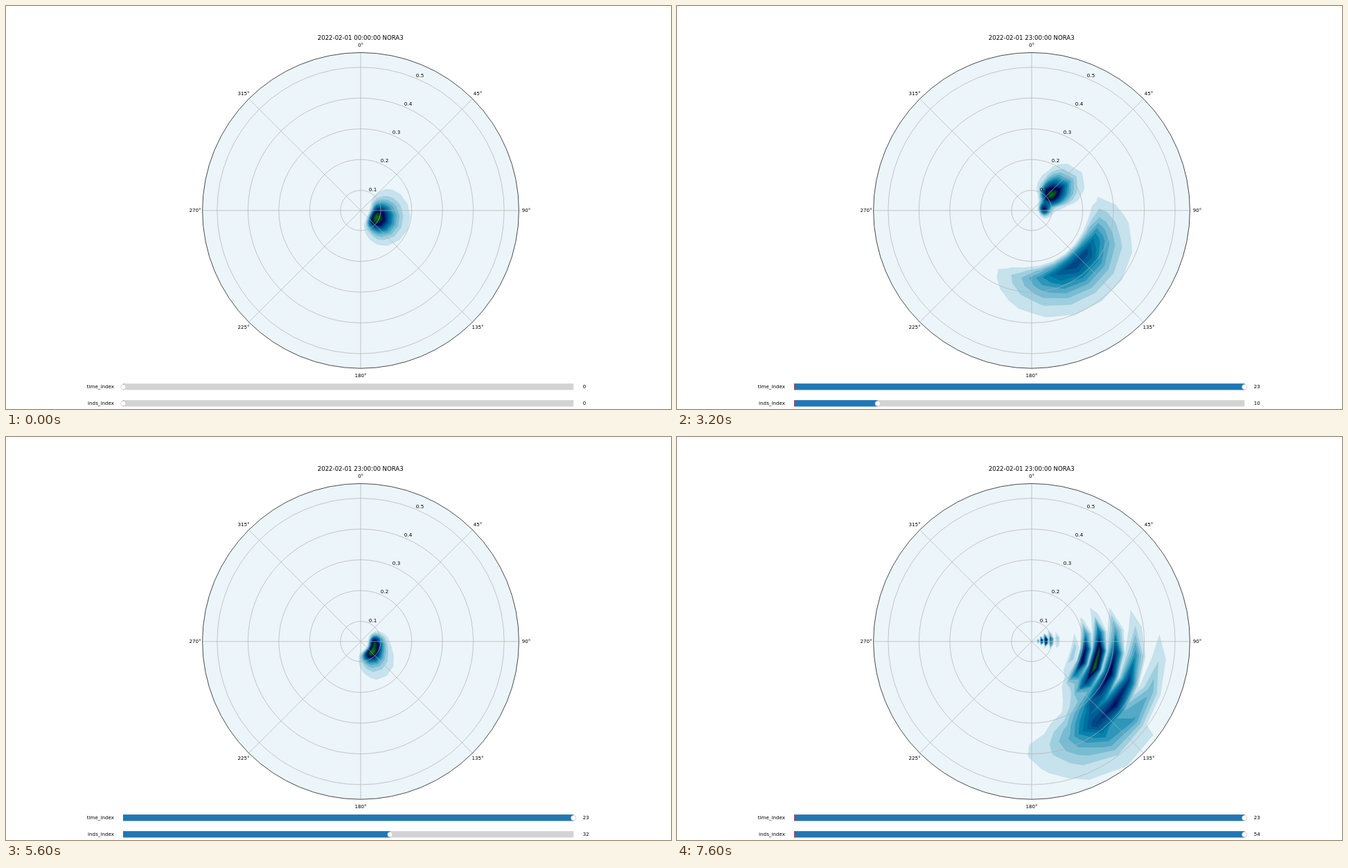
Animation of 960x583 px, one loop 7.8 s. Source, as an HTML page with a canvas:

```html
<!DOCTYPE html>
<html>
<head>
<meta charset="utf-8">
<style>
html, body { margin: 0; width: 100%; height: 100%; overflow: hidden; background: #fff; }
canvas { display: block; }
</style>
</head>
<body>
<canvas id="stage" width="960" height="583"></canvas>
<script>
const ctx = document.getElementById('stage').getContext('2d');
const CX = 512, CY = 295.8, R = 228.4, STEP = 200, FRAMES = 39;
const LEVELS = 20, DIRS = 24, FREQS = 30, F0 = 0.0345, SCALE = 445;

const mix = (a, b, u) => a + (b - a) * u;
const clamp = u => Math.min(1, Math.max(0, u));
const radius = f => SCALE * (f - F0);
const bearingOf = j => 7.5 + 15 * j;
const radiusOf = k => radius(F0 * 1.1 ** k);

// Wave energy around one bearing and radius: steep inwards, long tail outwards.
const lobe = (peak, bearing, r, left, right, near, far) => (b, q) => {
  const db = (b - bearing + 540) % 360 - 180, dr = q - r;
  const turn = (db / (db < 0 ? left : right)) ** 2;
  const reach = dr < 0 ? (-dr / near) ** 2.5 : (dr / far) ** 1.4;
  return peak * Math.exp(-turn - reach);
};

function normalise(grid) {
  const max = Math.max(...grid.flat());
  return grid.map(row => row.map(v => v / max * LEVELS));
}

// Samples the lobes; raggedness weakens every second frequency on the eastern side.
function spectrum(raggedness, ...lobes) {
  const grid = Array.from({ length: DIRS }, (_, j) => Array.from({ length: FREQS }, (_, k) => {
    const b = bearingOf(j), r = radiusOf(k);
    const dip = k % 2 ? 0 : raggedness * (1 - clamp((b - 117) / 28));
    return (1 - dip) * lobes.reduce((sum, f) => sum + f(b, r), 0);
  }));
  return normalise(grid);
}

const midnight = spectrum(0, lobe(20, 117, 26, 40, 28, 9, 17), lobe(1.6, 105, 48, 60, 50, 20, 28));
const evening = spectrum(0, lobe(20, 103, 22.6, 40, 48, 7, 12.5), lobe(1.7, 115, 42, 60, 50, 18, 24));
const crossing = spectrum(0,
  lobe(10, 136, 98, 36, 47, 13, 34), lobe(0.7, 150, 125, 50, 50, 25, 40),
  lobe(20, 50.6, 37.4, 20, 20, 13, 24), lobe(13, 82, 19, 25, 25, 7, 7));
const south = spectrum(0,
  lobe(20, 128, 23, 24, 32, 7, 10), lobe(16, 90, 20, 23, 23, 7, 10), lobe(2, 148, 42, 40, 32, 15, 24));
const southWide = spectrum(0,
  lobe(20, 135, 23, 26, 30, 7, 10), lobe(16, 95, 21, 25, 24, 7, 9), lobe(2.2, 146, 42, 40, 30, 15, 24));
const storm = spectrum(0.4, lobe(20, 172, 105, 52, 38, 17, 47), lobe(1.2, 125, 170, 60, 60, 50, 70));
const gusts = spectrum(0.88,
  lobe(20, 108, 95, 26, 22, 25, 40), lobe(9, 132, 150, 25, 22, 35, 35),
  lobe(2.2, 145, 165, 45, 38, 35, 50), lobe(17, 86, 20.8, 17, 17, 11, 11));

const poses = [
  [0, midnight], [10, evening], [12, evening], [16, crossing],
  [19, south], [28, southWide], [36, storm], [38, gusts]
];
const timeKeys = [[0, 0], [6, 7], [10, 20], [12, 23]];
const indsKeys = [[12, 0], [16, 10], [18, 12], [19, 14], [24, 27], [28, 32], [36, 52], [38, 54]];

// Neighbouring keys and the fraction between them.
function span(keys, at) {
  let i = keys.findIndex(k => k[0] > at);
  if (i < 0) i = keys.length;
  const a = keys[Math.max(i - 1, 0)], b = keys[Math.min(i, keys.length - 1)];
  return [a[1], b[1], a === b ? 0 : (at - a[0]) / (b[0] - a[0])];
}

function valueAt(keys, at) {
  const [a, b, u] = span(keys, at);
  return Math.round(mix(a, b, u));
}

function shade(i) {
  const x = 1 - (i + 0.5) / LEVELS;
  const rgb = [Math.max(0, 3 * x - 2), Math.abs(3 * x - 1) / 2, x];
  return `rgb(${rgb.map(c => Math.round(c * 255))})`;
}

function disc(r) {
  ctx.beginPath();
  ctx.arc(CX, CY, r, 0, 2 * Math.PI);
}

// Adds the part of a cell that lies at or above the level to the path.
function addCell(corners, level) {
  if (corners.every(c => c[2] < level)) return;
  let started = false;
  const add = (x, y) => {
    if (started) ctx.lineTo(x, y); else ctx.moveTo(x, y);
    started = true;
  };
  corners.forEach((p, i) => {
    const q = corners[(i + 1) % corners.length];
    if (p[2] >= level) add(p[0], p[1]);
    if (p[2] >= level !== q[2] >= level) {
      const u = (level - p[2]) / (q[2] - p[2]);
      add(mix(p[0], q[0], u), mix(p[1], q[1], u));
    }
  });
  ctx.closePath();
}

function drawSpectrum(frame) {
  const [from, to, u] = span(poses, frame);
  const grid = normalise(from.map((row, j) => row.map((v, k) => mix(v, to[j][k], u))));
  const nodes = grid.map((row, j) => row.map((v, k) => {
    const a = bearingOf(j) * Math.PI / 180, r = radiusOf(k);
    return [CX + r * Math.sin(a), CY - r * Math.cos(a), v];
  }));
  disc(R);
  ctx.fillStyle = shade(0);
  ctx.fill();
  for (let level = 1; level < LEVELS; level++) {
    ctx.beginPath();
    nodes.forEach((row, j) => {
      const next = nodes[(j + 1) % DIRS];
      for (let k = 0; k < FREQS - 1; k++) {
        addCell([row[k], row[k + 1], next[k + 1], next[k]], level);
      }
    });
    ctx.fillStyle = shade(level);
    ctx.fill();
  }
}

// Large type scaled down keeps fractional letter widths.
function text(str, x, y, size = 7.15, align = 'center') {
  ctx.save();
  ctx.translate(x, y + size * 0.36);
  ctx.scale(size / 100, size / 100);
  ctx.font = '100px "DejaVu Sans", sans-serif';
  ctx.textAlign = align;
  ctx.fillStyle = '#000';
  ctx.fillText(str, 0, 0);
  ctx.restore();
}

function drawGrid() {
  ctx.lineWidth = 0.7;
  ctx.strokeStyle = '#b0b0b0';
  for (let i = 0; i < 8; i++) {
    const a = i * Math.PI / 4, s = Math.sin(a), c = Math.cos(a);
    ctx.beginPath();
    ctx.moveTo(CX, CY);
    ctx.lineTo(CX + R * s, CY - R * c);
    ctx.stroke();
    text(i * 45 + '°', CX + 239 * s, CY - 239 * c);
  }
  for (let i = 1; i <= 5; i++) {
    disc(radius(i / 10));
    ctx.stroke();
    text('0.' + i, 512.5 + 17 * i, 306.1 - 41.1 * i);
  }
  disc(R);
  ctx.strokeStyle = '#000';
  ctx.stroke();
}

function drawSlider(label, y, value, max) {
  const x = 169.3, w = 650, h = 9.2, pos = w * value / max;
  const bar = (color, left, width) => {
    ctx.fillStyle = color;
    ctx.fillRect(left, y - h / 2, width, h);
  };
  bar('#d3d3d3', x, w);
  bar('#1f77b4', x, pos);
  bar('#f00', x - 0.3, 0.6);
  ctx.beginPath();
  ctx.arc(x + pos, y + 0.3, 3.7, 0, 2 * Math.PI);
  ctx.fillStyle = '#fff';
  ctx.fill();
  ctx.strokeStyle = '#bfbfbf';
  ctx.stroke();
  text(label, 156, y, 7.15, 'right');
  text(value, 832.7, y, 7.15, 'left');
}

let shown = -1;
function draw() {
  requestAnimationFrame(draw);
  const frame = Math.floor(performance.now() / STEP) % FRAMES;
  if (frame === shown) return;
  shown = frame;
  const hour = valueAt(timeKeys, frame);
  ctx.fillStyle = '#fff';
  ctx.fillRect(0, 0, 960, 583);
  drawSpectrum(frame);
  drawGrid();
  text(`2022-02-01 ${String(hour).padStart(2, '0')}:00:00 NORA3`, CX - 0.3, 45.5, 8.58);
  drawSlider('time_index', 550.8, hour, 23);
  drawSlider('inds_index', 574.8, valueAt(indsKeys, frame), 54);
}
draw();
</script>
</body>
</html>
```
